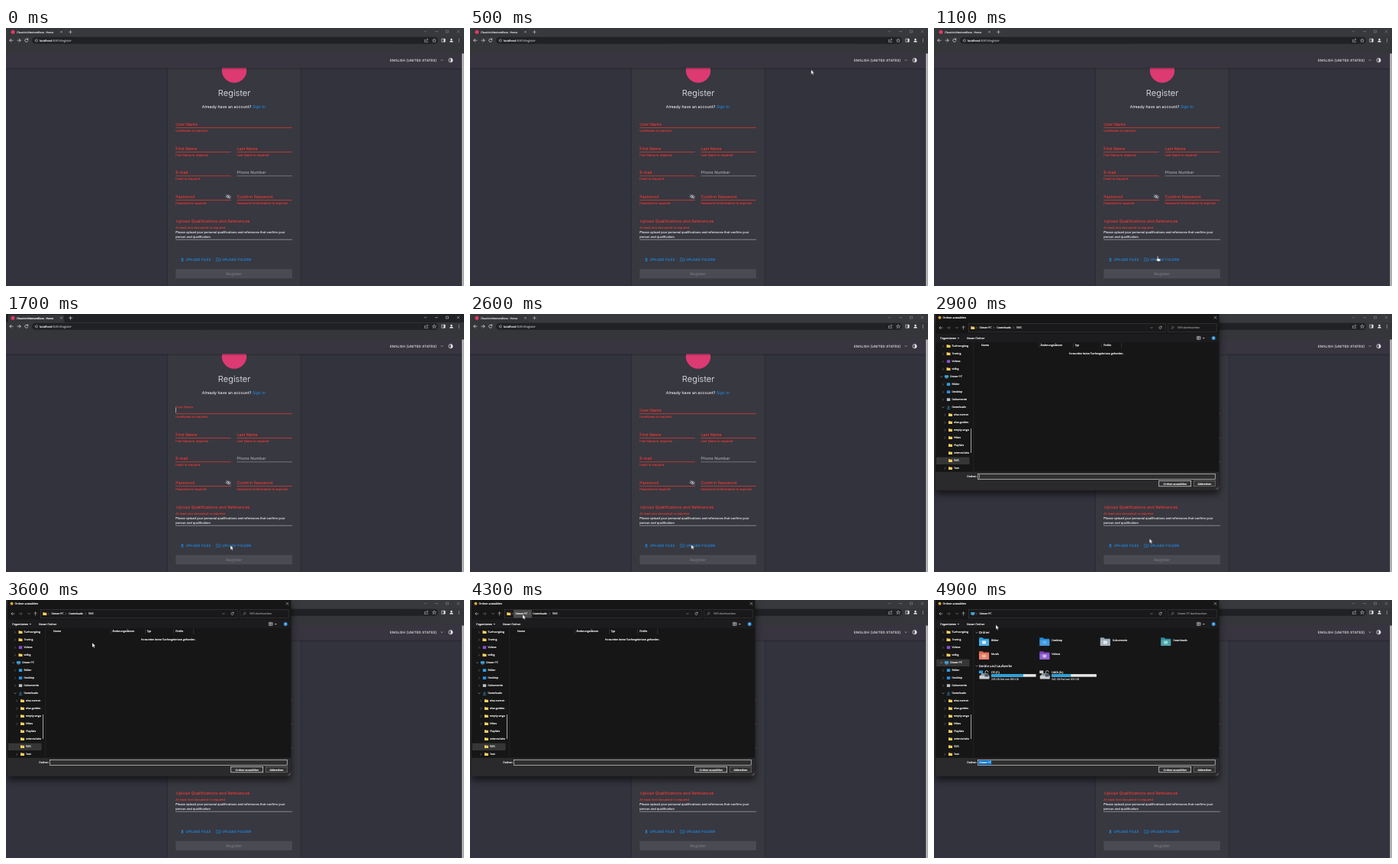
An HTML page that plays this animation: 600x338 px, repeating every 5 s.

```html
<!DOCTYPE html>
<html lang="en">
<head>
<meta charset="utf-8">
<title>Register</title>
<style>
html, body { margin: 0; width: 100%; height: 100%; overflow: hidden; background: #32333d; }
svg { display: block; width: 100%; height: 100%; }
text { font-family: Inter, sans-serif; text-rendering: geometricPrecision; white-space: pre; stroke-width: .1; }
.ui { font-family: "Open Sans", "Noto Sans", sans-serif; stroke-width: .17; }
.line { fill: none; stroke-linecap: round; stroke-linejoin: round; }

/* Parts that switch on and off */
.active, .rest, .dialog, .folder, .empty, .hover, .computer, .caret, .hand, .arrow {
  animation: 5s step-end infinite;
}
.active { animation-name: active; }
.rest { animation-name: rest; }
.dialog { animation-name: dialog; }
.folder { animation-name: folder; }
.empty { animation-name: empty; }
.hover { animation-name: hover; }
.computer { animation-name: computer; }
.caret { animation-name: caret; }
.hand { animation-name: hand; }
.arrow { animation-name: arrow; }
@keyframes active { 0% { opacity: 0 } 30% { opacity: 1 } 42% { opacity: 0 } }
@keyframes rest { 0% { opacity: 1 } 30% { opacity: 0 } 42% { opacity: 1 } }
@keyframes dialog { 0% { opacity: 0 } 56% { opacity: 1 } }
@keyframes folder { 0% { opacity: 1 } 92% { opacity: 0 } }
@keyframes empty { 0% { opacity: 1 } 88% { opacity: 0 } }
@keyframes hover { 0% { opacity: 0 } 84% { opacity: 1 } 92% { opacity: 0 } }
@keyframes computer { 0% { opacity: 0 } 92% { opacity: 1 } }
@keyframes caret { 0% { opacity: 1 } 64% { opacity: 0 } 74% { opacity: 1 } 84% { opacity: 0 } }
@keyframes hand { 0% { opacity: 0 } 22% { opacity: 1 } 30% { opacity: 0 } }
@keyframes arrow { 0% { opacity: 0 } 2% { opacity: 1 } 22% { opacity: 0 } 30% { opacity: 1 } }

.label { animation: float 5s infinite; transform-origin: 222px 128px; }
@keyframes float {
  0%, 30% { transform: none }
  33%, 41.9% { transform: translateY(-4.6px) scale(.8) }
  42%, 100% { transform: none }
}

.pointer { animation: move 5s infinite; }
@keyframes move {
  0%, 2% { transform: translate(578px, 5px); animation-timing-function: steps(5) }
  12% { transform: translate(414px, 67px); animation-timing-function: steps(5) }
  22% { transform: translate(292.5px, 299px); animation-timing-function: steps(6) }
  34% { transform: translate(294px, 303px); animation-timing-function: steps(9) }
  52% { transform: translate(289.7px, 302px); animation-timing-function: steps(3) }
  58%, 60% { transform: translate(282.3px, 294.3px); animation-timing-function: steps(6) }
  72% { transform: translate(113px, 56px); animation-timing-function: steps(6) }
  84%, 92% { transform: translate(69px, 19px); animation-timing-function: steps(3) }
  98%, 100% { transform: translate(81px, 32.5px) }
}
</style>
</head>
<body>
<svg id="stage" viewBox="0 0 600 338" preserveAspectRatio="none"></svg>
<script>
const RED = '#ea3b36', BLUE = '#1f86da', PALE = '#e4e4e8', GREY = '#a4a4ac';

const paint = c => `fill="${c}" stroke="${c}"`;
const text = (x, y, s, size, color, extra = '') =>
  `<text x="${x}" y="${y}" font-size="${size}" ${paint(color)} ${extra}>${s}</text>`;
const ui = (x, y, s, color = '#f4f4f4', size = 3.55, extra = '') =>
  text(x, y, s, size, color, `class="ui" ${extra}`);
const rect = (x, y, w, h, fill, extra = '') =>
  `<rect x="${x}" y="${y}" width="${w}" height="${h}" fill="${fill}" ${extra}/>`;
const dot = (x, y, r, fill, extra = '') =>
  `<circle cx="${x}" cy="${y}" r="${r}" fill="${fill}" ${extra}/>`;
const line = (d, stroke = '#ddd', w = .6) =>
  `<path class="line" d="${d}" stroke="${stroke}" stroke-width="${w}"/>`;
const group = (name, ...parts) => `<g class="${name}">${parts.join('')}</g>`;
const right = (x, y, c = '#aaa') => line(`M${x - .5} ${y - 1}l1 1l-1 1`, c, .45);
const down = (x, y, c = '#ccc', r = 1.2) => line(`M${x - r} ${y - r / 2}l${r} ${r}l${r} ${-r}`, c, .5);
const cross = (x, y, r = 1.5, c = '#ddd') =>
  line(`M${x - r} ${y - r}l${2 * r} ${2 * r}m0 ${-2 * r}l${-2 * r} ${2 * r}`, c, .5);

// Browser window
function tabStrip(bg, ink, controls) {
  return rect(0, 0, 600, 11, bg) +
    `<path d="M1 11q2 0 2-2V3q0-2 2-2h69q2 0 2 2v6q0 2 2 2z" fill="#35363a"/>` +
    dot(9, 5.2, 2.5, '#e03a62') +
    ui(14, 6.5, 'CleanArchitectureBase - Home', ink, 3.4) +
    cross(72.5, 5.2, 1) +
    line('M82.5 5.2h4m-2-2v4', ink, .6) + down(549.5, 4.6, controls) +
    line('M562.5 4.6h3', controls, .5) + line('M576.7 3.2h2.8v2.8h-2.8z', controls, .5) +
    cross(592.5, 4.6, 1.4, controls);
}

function browser() {
  return rect(0, 0, 600, 33, '#35363a') +
    group('rest', tabStrip('#37393d', '#d0d1d4', '#96979b')) +
    group('active', tabStrip('#202124', '#f1f1f1', '#e6e6e6')) +
    rect(34, 11.8, 532, 9, '#202124', 'rx="4.5"') +
    line('M9 16.2H4.8m2-2l-2 2l2 2', '#e2e2e2', .7) +
    line('M15 16.2h4.2m-2-2l2 2l-2 2', '#e2e2e2', .7) +
    line('M28.6 15a2.1 2.1 0 1 0 .2 2M28.8 13.8v1.4h-1.4', '#e2e2e2', .7) +
    line('M38.2 16.3a1.7 1.7 0 1 0 3.4 0a1.7 1.7 0 1 0-3.4 0M39.9 16.2v.8', '#c8c8c8', .5) +
    ui(44, 17.6, `localhost<tspan ${paint('#9aa0a6')}>:5081/Register</tspan>`, '#f1f1f1', 3.85) +
    line('M549.5 15.4h-1v3h4v-1.2M550 17q.3-2.2 2.6-2.2m-.9-1l1 1l-1 1', '#ccc', .5) +
    line('M561 14l.7 1.6l1.8.1l-1.4 1.1l.5 1.7l-1.6-1l-1.6 1l.5-1.7l-1.4-1.1l1.8-.1z', '#ccc', .5) +
    line('M571.2 14.2h4v4h-4z', '#eee', .6) + rect(573.4, 14.2, 1.8, 4, '#eee') +
    dot(583.5, 15, 1.2, '#eee') + `<path d="M581.2 18.6q0-2 2.3-2t2.3 2z" fill="#eee"/>` +
    [14.4, 16.2, 18].map(y => dot(593.3, y, .5, '#ddd')).join('');
}

// Page
const label = (x, y, s, color = RED) => text(x, y, s, 5.2, color, 'letter-spacing=".12"');
const note = (x, y, s) => text(x, y, s, 3.85, RED, 'letter-spacing=".11"');
const under = (x, y, w, fill = RED) => rect(x, y, w, .7, fill);
const field = (x, y, w, name, error) =>
  label(x, y, name, error ? RED : GREY) + under(x, y + 2.5, w, error ? RED : '#8a8a92') +
  (error ? note(x, y + 8.4, error) : '');

function page() {
  return rect(0, 33, 600, 305, '#32333d') +
    rect(212, 50, 173.5, 290, '#373740', 'filter="url(#soft)"') +
    dot(299, 55.5, 16.2, '#dd3a72') +
    rect(0, 33, 597, 19.3, '#373641', 'filter="url(#soft)"') +
    rect(597, 33, 3, 305, '#2c2c30') + rect(597.4, 33.4, 2.3, 304.6, '#cacacc') +
    text(503, 44, 'ENGLISH (UNITED STATES)', 4.4, PALE, 'letter-spacing=".18"') +
    down(571, 42.3, PALE) +
    dot(582.5, 42.2, 2.6, 'none', `stroke="${PALE}" stroke-width=".8"`) +
    `<path d="M582.5 39.6a2.6 2.6 0 0 1 0 5.2z" fill="${PALE}"/>` +
    text(299, 89, 'Register', 11, PALE, 'text-anchor="middle" font-weight="300" letter-spacing=".1"') +
    text(256.8, 104.7, `Already have an account? <tspan ${paint(BLUE)}>Sign In</tspan>`, 5.1, PALE, 'letter-spacing=".1"') +
    group('label', label(222.3, 128, 'User Name')) + under(222.3, 130.4, 152.7) +
    note(222.3, 136.4, 'UserName is required') +
    group('active', rect(222.2, 122.5, .6, 7, PALE)) +
    field(222.3, 159.5, 72.5, 'First Name', 'First Name is required') +
    field(302.5, 159.5, 72.5, 'Last Name', 'Last Name is required') +
    field(222.3, 191, 72.5, 'E-mail', 'Email is required') +
    field(302.5, 191, 72.5, 'Phone Number') +
    field(222.3, 222.8, 72.5, 'Password', 'Password is required') +
    field(302.5, 222.8, 72.5, 'Confirm Password', 'Password Confirmation is required') +
    line('M288.2 221q3-4 6.2 0q-3.2 4-6.2 0M289 218.4l4.8 5', '#d0d0d4', .7) + dot(291.3, 221, 1, '#d0d0d4') +
    label(222.8, 254.5, 'Upload Qualifications and References') +
    note(222.3, 262.8, 'At least one document is required') +
    text(222.3, 269.2, 'Please upload your personal qualifications and references that confirm your', 4, PALE) +
    text(222.3, 275.4, 'person and qualification', 4, PALE) +
    under(222.3, 276.8, 152.7, '#aaaab0') +
    `<path d="M231 301l1.8 2h-1.1v1.4h-1.4V303h-1.1zM229.2 304.8h3.6v.7h-3.6z" fill="${BLUE}"/>` +
    text(235.8, 304.7, 'UPLOAD FILES', 4.3, BLUE, 'font-weight="500" letter-spacing=".2"') +
    line('M275.8 301.4h1.8l.6.7h2.6v3.2h-5z', BLUE, .6) + line('M278.4 304.6v-1.5m-.7.7l.7-.7l.7.7', BLUE, .45) +
    text(283.2, 304.7, 'UPLOAD FOLDER', 4.3, BLUE, 'font-weight="500" letter-spacing=".2"') +
    rect(222.3, 315.8, 152.7, 12.2, '#4a4a52', 'rx="1.2"') +
    text(298.7, 323.8, 'Register', 5.2, '#77777f', 'text-anchor="middle" letter-spacing=".12"');
}

// Folder picker
const folder = (x, y, fill = '#fbd05c') =>
  `<path d="M${x - 2.5} ${y - 2}h1.9l.7.6h2.4v3.3h-5z" fill="${fill}"/>`;
const monitor = (x, y) =>
  rect(x - 2.6, y - 2, 5.2, 3.2, '#35a4dc') + rect(x - 1.4, y + 1.5, 2.8, .6, '#a8c4d4');

// name, indent, arrow (0 none, 1 closed, 2 open), icon colour
const tree = [
  ['Suchvorgäng', 1, 1], ['Tracing', 1, 1], ['Videos', 1, 1, '#8d4fd0'], ['vidbg', 1, 1],
  ['Dieser PC', 0, 2], ['Bilder', 1, 1, '#2f9fe0'], ['Desktop', 1, 1, '#2f8fd8'],
  ['Dokumente', 1, 1, '#b4bfc8'], ['Downloads', 1, 2, 'get'],
  ['elsa-core-m', 2, 1], ['elsa-guides-', 2, 1], ['empty-angu', 2, 1], ['Hikes', 2, 1],
  ['Playlists', 2, 0], ['science-labs', 2, 0], ['SVG', 2, 0], ['Test', 2, 1]
];

function treeRow([name, depth, arrow, icon], i) {
  const y = 42.2 + i * 10, x = 9.5 + depth * 2.5;
  const mark = arrow == 1 ? right(x, y) : arrow ? down(x, y) : '';
  const cx = x + 7;
  let pic = folder(cx, y);
  if (!depth) pic = monitor(cx, y);
  else if (icon == 'get') pic = line(`M${cx} ${y - 2}v3m-1.4-1.4l1.4 1.4l1.4-1.4M${cx - 1.8} ${y + 2.2}h3.6`, '#35a4dc', .6);
  else if (icon) pic = rect(cx - 2.2, y - 1.9, 4.4, 3.8, icon, 'rx=".5"');
  return mark + pic + ui(x + 11.5, y + 1.2, name);
}

function bigFolder(x, y, name, fill, inner) {
  return `<path d="M${x} ${y}h4.6l1.5 1.4h7v9.4H${x}z" fill="${fill}"/>` +
    rect(x, y + 3, 13.1, 7.8, '#fff', 'opacity=".16"') +
    rect(x + 4, y + 4.2, 5, 4, inner, 'rx=".8"') + ui(x + 16, y + 4.8, name);
}

function drive(x, name, used, free, tint) {
  return `<path d="M${x + 1.5} 99l1.8-3h8l1.8 3z" fill="#8d959b"/>` +
    rect(x + .5, 99, 13, 4.6, '#c9ced2', 'rx=".5"') + rect(x, 92.5, 5, 3.6, tint) +
    line(`M${x + 8.2} 96.5v-2.2a1.8 1.8 0 0 1 3.6 0`, '#e8e8e8', .7) + rect(x + 7.4, 96.5, 5, 4, '#4b5864') +
    ui(x + 16, 95.6, name) + rect(x + 16, 97.1, 58.6, 3.6, '#e6e6e6') +
    rect(x + 16, 97.1, used, 3.6, '#26a0da') + ui(x + 16, 104.8, free, '#c8c8c8', 3.35);
}

function crumbs() {
  return group('hover', rect(57, 13, 24, 10.4, '#4a4a4a')) +
    group('folder', folder(50.8, 18.2), right(56, 18), ui(59.6, 19.4, 'Dieser PC'), right(78.6, 18),
      ui(82.3, 19.4, 'Downloads'), right(104.3, 18), ui(108, 19.4, 'SVG'),
      ui(319, 19.4, 'SVG durchsuchen', '#8c8c8c')) +
    group('computer', monitor(50.8, 18), right(56, 18), ui(59.6, 19.4, 'Dieser PC'),
      ui(319, 19.4, 'Dieser PC durchsuchen', '#8c8c8c'));
}

function dialog() {
  return rect(2, 0, 371.5, 231, '#181719', 'filter="url(#deep)"') +
    dot(7.5, 4.8, 2, '#dca23a') +
    ui(11.6, 6, 'Ordner auswählen') + cross(368.5, 4.7) +
    line('M11 18H7m1.7-1.7L7 18l1.7 1.7', '#ddd', .55) +
    line('M17 18h4m-1.7-1.7L21 18l-1.7 1.7', '#777', .55) + down(30, 18) +
    line('M38.5 20v-4m-1.7 1.7l1.7-1.7l1.7 1.7', '#ddd', .55) +
    rect(45.7, 12.6, 257.5, 11.2, '#19181a', 'stroke="#444" stroke-width=".5"') +
    rect(306.8, 12.6, 63.4, 11.2, '#19181a', 'stroke="#444" stroke-width=".5"') +
    crumbs() + down(285, 18) +
    line('M298 17a1.7 1.7 0 1 0 .1 1.6M298.2 16v1.2H297', '#ddd', .5) +
    dot(312.8, 17.4, 1.2, 'none', 'stroke="#999" stroke-width=".5"') + line('M312 18.4l-1.4 1.4', '#999', .5) +
    rect(2, 25.5, 371.5, 11.5, '#1c1b1d') +
    ui(8, 32.7, 'Organisieren') + `<path d="M30.6 30.9h2.6l-1.3 1.5z" fill="#ddd"/>` +
    ui(43, 32.7, 'Neuer Ordner') +
    line('M344.8 29.4h4.2v4h-4.2zm0 1.3h4.2m0 1.3h-4.2m1.6-2.6v4', '#ddd', .5) +
    `<path d="M352 30.9h2.6l-1.3 1.5z" fill="#ddd"/>` +
    dot(366.2, 31.4, 2.5, '#2b8fd6') + ui(366.2, 32.7, '?', '#fff', 3.5, 'text-anchor="middle"') +
    group('folder', rect(3, 187.6, 43.5, 9.4, '#363636')) +
    group('computer', rect(3, 77.6, 43.5, 9.4, '#363636')) +
    `<g clip-path="url(#pane)">${tree.map(treeRow).join('')}</g>` +
    rect(48.1, 150, .9, 32, '#b8b8b8') + rect(51.6, 37, .5, 169.5, '#303030') +
    group('empty',
      [137.5, 182, 219.5, 245].map(x => rect(x, 38, .4, 6.5, '#555')).join(''),
      ui(62, 42.3, 'Name'), ui(139.4, 42.3, 'Änderungsdatum'), ui(184.4, 42.3, 'Typ'), ui(222, 42.3, 'Größe'),
      line('M158 39.2l1-.9l1 .9', '#bbb', .4),
      ui(212.7, 53.1, 'Es wurden keine Suchergebnisse gefunden.', '#f4f4f4', 3.55, 'text-anchor="middle"')) +
    group('computer',
      down(56, 42.8), ui(58.8, 44.2, 'Ordner', '#f2f2f2', 4.2),
      bigFolder(59, 49.3, 'Bilder', '#2b9be0', '#d8effc'), bigFolder(138.3, 49.3, 'Desktop', '#1f86d4', '#57b6f2'),
      bigFolder(217.8, 49.3, 'Dokumente', '#97a5b0', '#e4e9ec'), bigFolder(297.2, 49.3, 'Downloads', '#2f8c9c', '#8fdcd4'),
      bigFolder(59, 67.2, 'Musik', '#e0694f', '#f6b0a0'), bigFolder(138.3, 67.2, 'Videos', '#7b43c4', '#d0b4f4'),
      down(56, 86.4), ui(58.8, 87.8, 'Geräte und Laufwerke', '#f2f2f2', 4.2),
      drive(59, 'OS (C:)', 42, '265 GB frei von 930 GB', '#2aa2e6'),
      drive(138.3, 'DATA (D:)', 25, '542 GB frei von 932 GB', '#c9ced2')) +
    rect(2, 206.8, 371.5, 24.2, '#2a292b') + ui(43, 214.2, 'Ordner:') +
    rect(57.5, 209.4, 310.8, 7, '#303031', 'stroke="#cfcfcf" stroke-width=".7"') +
    group('folder', group('caret', rect(59, 210.4, .5, 5, '#fff'))) +
    group('computer', rect(58.5, 210.2, 16.8, 5.4, '#0078d7'), ui(59, 214.2, 'Dieser PC')) +
    rect(294.7, 218.6, 42, 7.2, '#333', 'stroke="#e0e0e0" stroke-width=".7"') +
    ui(315.7, 223.5, 'Ordner auswählen', '#fff', 3.5, 'text-anchor="middle"') +
    rect(340.6, 218.6, 27.8, 7.2, '#333', 'stroke="#8c8c8c" stroke-width=".5"') +
    ui(354.5, 223.5, 'Abbrechen', '#fff', 3.5, 'text-anchor="middle"') +
    line('M370 229.4l2.4-2.4m-1 2.4l1-1', '#aaa', .5);
}

const pointer = group('pointer',
  group('arrow', `<path d="M0 0v5.9l1.4-1.2l.9 2l1-.4l-.9-2h1.8z" fill="#fff" stroke="#111" stroke-width=".3"/>`),
  group('hand', `<path d="M0 .5q.7-.9 1.3 0v2.4l2.2.5q.8.3.6 1.2l-.6 2.1H.4L-1.6 4q.1-.9.9-.5l.7.6z" fill="#fff" stroke="#111" stroke-width=".35"/>`));

document.getElementById('stage').innerHTML = `
  <defs>
    <filter id="soft" x="-10%" y="-20%" width="120%" height="150%">
      <feDropShadow dx="0" dy=".8" stdDeviation="1.2" flood-opacity=".4"/>
    </filter>
    <filter id="deep" x="-10%" y="-10%" width="120%" height="130%">
      <feDropShadow dx="0" dy="5" stdDeviation="5" flood-opacity=".6"/>
    </filter>
    <clipPath id="pane"><rect x="2" y="37" width="44.8" height="169.8"/></clipPath>
  </defs>` + page() + browser() + group('dialog', dialog()) + pointer;
</script>
</body>
</html>
```
